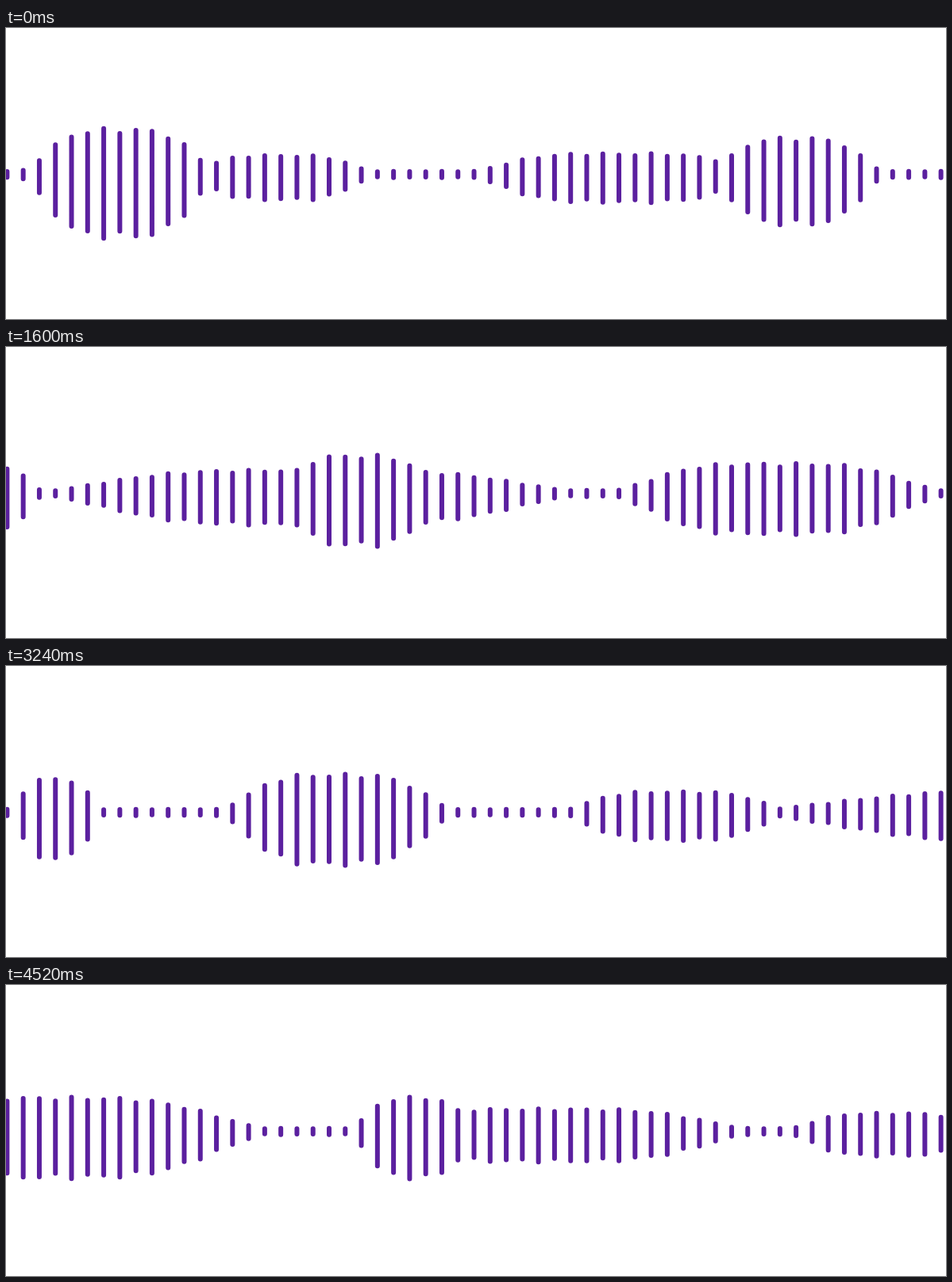
Write an HTML page with a canvas that moves like this. It is 1184 px wide and 367 px high and loops after 4.56 s.

```html
<!DOCTYPE html>
<html lang="en">
<head>
<meta charset="utf-8">
<title>Sound wave</title>
<style>
  html, body { margin: 0; height: 100%; overflow: hidden; background: #fff; }
  canvas { display: block; width: 100%; height: 100%; }
</style>
</head>
<body>
<canvas id="stage" width="1184" height="367"></canvas>
<script>
const LOOP = 4560, STEP = 40;          // ms
const BARS = 59, FIRST_X = 1.4, GAP = 20.28;
const MIDDLE = 184, CAP = 3;
const BARS_PER_STEP = 3.63;
const QUIET = 6;                       // height between the words
const SKEW = 1.42;                     // the wave swings further down than up

// Words of the recording: centre and half width in bars, peak height in px
const words = [
  [7, 5, 57], [17, 5, 25], [38, 8, 27], [49, 4.5, 46], [70, 9, 25],
  [101, 12, 54], [121, 2.6, 23], [127.5, 4, 32], [144.5, 2.4, 33],
  [164, 14, 30], [167, 4.5, 48], [193, 8.5, 38], [224, 14, 28],
  [257, 11, 30], [272.5, 4.5, 25], [281.3, 3.3, 60], [297, 2.4, 43],
  [314.5, 6, 48], [335.5, 6, 27], [364, 20, 30], [391, 5.5, 43],
  [413, 11, 43], [435.5, 3.3, 43], [443.5, 11, 29], [465, 5.5, 24]
];

// Each word is a flat-topped bell; the loudest one wins, with a fine ripple
function loudness(x) {
  const bells = words.map(([centre, width, peak]) =>
    peak * Math.exp(-(((x - centre) / width) ** 4)));
  return Math.max(QUIET, ...bells) * (1 + 0.06 * Math.sin(x * 2.4));
}

const ctx = document.getElementById("stage").getContext("2d");
ctx.strokeStyle = "#5b209f";
ctx.lineWidth = CAP * 2;
ctx.lineCap = "round";

function draw(time) {
  const scroll = Math.floor(time % LOOP / STEP) * BARS_PER_STEP;
  ctx.clearRect(0, 0, 1184, 367);
  ctx.beginPath();
  for (let i = 0; i < BARS; i++) {
    const x = FIRST_X + i * GAP;
    const up = loudness(scroll + i) - CAP;
    ctx.moveTo(x, MIDDLE - up);
    ctx.lineTo(x, MIDDLE + up * SKEW);
  }
  ctx.stroke();
}

const start = performance.now();
function tick() {
  draw(performance.now() - start);
  requestAnimationFrame(tick);
}
tick();
</script>
</body>
</html>
```
